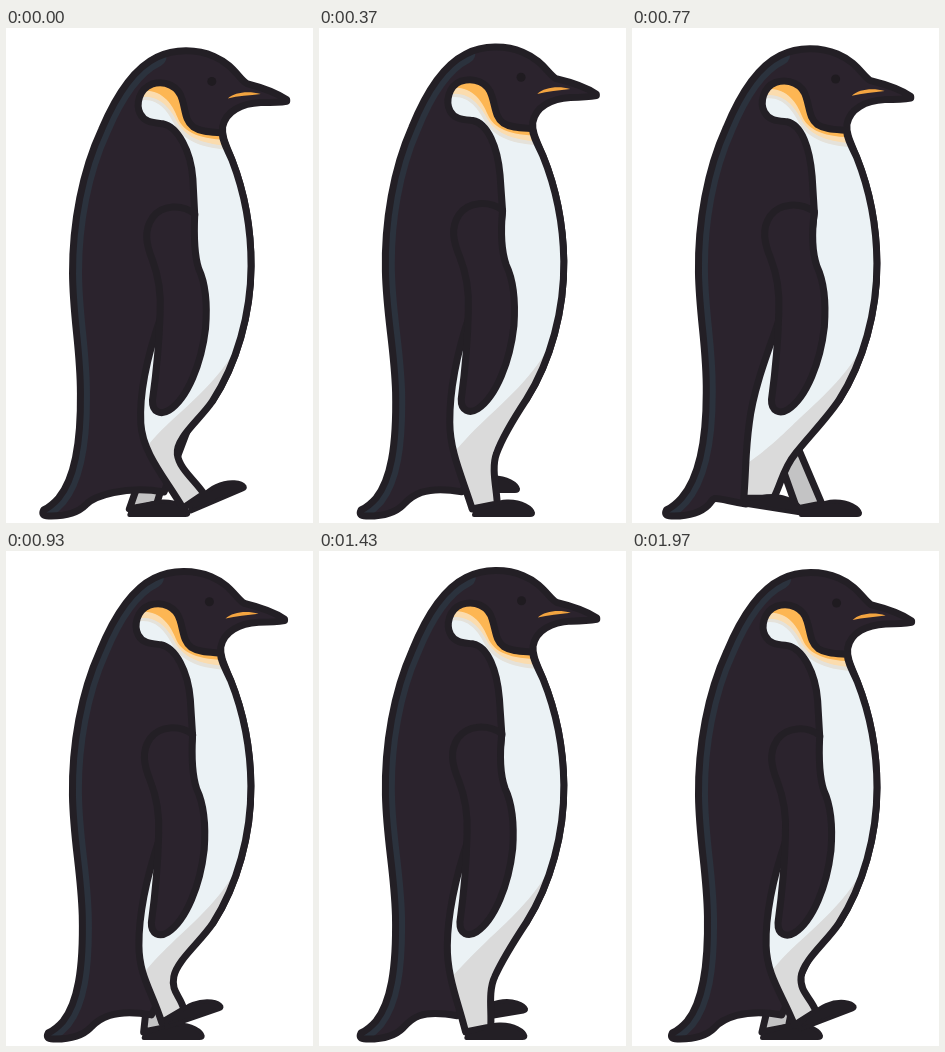
An HTML page for the animation above (2010 ms loop, 307 by 495 pixels).

```html
<!DOCTYPE html>
<html lang="en">
<head>
<meta charset="utf-8">
<title>Walking penguin</title>
<style>
  html, body { margin: 0; width: 100%; height: 100%; overflow: hidden; background: #fff; }
  svg { display: block; width: 100vw; height: 100vh; }
  path { fill: none; stroke-linejoin: round; stroke-linecap: round; }
  .dark { fill: #2b232d; }
  .line { stroke: #231f25; stroke-width: 7; }
  .foot { fill: #231f25; stroke: #231f25; stroke-width: 4; }
  .farLeg { fill: #c3c3c4; }
  .back { stroke: #2b323d; stroke-width: 19; }
  .white { fill: #ebf2f5; }
  .shade { fill: #dadada; }
  .cream { fill: #e5e2da; }
  .peach { fill: #fbdcae; }
  .orange { fill: #fdb653; }
  .eye { stroke: #1f1b20; stroke-width: 9; }
  .mouth { fill: #f3a440; }
</style>
</head>
<body>
<svg viewBox="0 0 307 495">
  <defs>
    <clipPath id="bodyClip"><path class="body"/></clipPath>
    <clipPath id="frontClip"><path class="front"/></clipPath>
  </defs>
  <path class="farLeg line"/>
  <path class="farFoot foot"/>
  <path class="body dark"/>
  <g clip-path="url(#bodyClip)"><path class="back"/></g>
  <path class="body line"/>
  <path class="front white"/>
  <g clip-path="url(#frontClip)">
    <path class="shade"/>
    <path class="cream"/>
    <path class="peach"/>
    <path class="orange"/>
  </g>
  <path class="front line"/>
  <path class="nearFoot foot"/>
  <path class="flipper dark line"/>
  <path class="eye"/>
  <path class="mouth"/>
</svg>
<script>
const FRAME = 33.5, CYCLE = 30;

// One stride: phase, heel x, heel y, foot angle, knee x, thigh x
const STRIDE = [
  [0, 184, 486, -23, 171.5, 135],
  [2, 186, 488, -16, 172, 134.5],
  [5, 184, 489, 0, 172, 134],
  [8, 169, 489, 0, 175, 132],
  [11, 153, 489, 0, 177, 130],
  [14, 130, 489, 0, 172, 123],
  [17, 110, 489, 0, 165, 115],
  [20, 100, 489, 0, 163, 110],
  [22, 101, 484, 8, 163, 113],
  [24, 116, 472, 10, 163, 121],
  [26, 140, 465, 0, 165, 128],
  [28, 159, 479, -19, 167.5, 132.5],
  [29, 167, 481, -21, 169, 134]
];
const FOOT = 'M2,-2 L4,-8 C15,-9 22,-15 35,-15.5 C50,-16 60,-9 61,-4 Q61,-2 58,-2 Z';

const clamp = (v, a, b) => Math.min(b, Math.max(a, v));
const wave = (phase, peak, period) => Math.cos(2 * Math.PI * (phase - peak) / period);
const mapPoints = (d, fn) => d.replace(/(-?[\d.]+),(-?[\d.]+)/g,
  (_, x, y) => fn(+x, +y).map(v => v.toFixed(2)).join(','));

const parts = {};
for (const el of document.querySelectorAll('path'))
  (parts[el.classList[0]] ||= []).push(el);
const set = (name, d) => parts[name].forEach(el => el.setAttribute('d', d));

function stride(phase, shift = 0) {
  const p = phase % CYCLE;
  let i = STRIDE.length - 1;
  while (STRIDE[i][0] > p) i--;
  const a = STRIDE[i], b = STRIDE[(i + 1) % STRIDE.length];
  const k = (p - a[0]) / ((b[0] || CYCLE) - a[0]);
  const [, x, y, angle, knee, thigh] = a.map((v, j) => v + (b[j] - v) * k);
  const r = angle * Math.PI / 180;
  const place = (u, v) => [
    x + shift + u * Math.cos(r) - v * Math.sin(r),
    y + u * Math.sin(r) + v * Math.cos(r)
  ];
  const lean = (x - 140) * 0.14;
  return {
    knee, thigh,
    foot: mapPoints(FOOT, place),
    heel: place(2 - Math.max(lean, 0), -8),
    ankle: place(27 - lean, -13)
  };
}

function draw(phase) {
  const bob = wave(phase, 3.1, 15);
  const swing = wave(phase, 3, CYCLE);
  const tail = -2 - 7.5 * wave(phase, 4.2, 15) + 1.5 * swing;
  const near = stride(phase), far = stride(phase + 15, -2);

  // The torso nods with each step; the feet stay put.
  const bend = (name, d) => set(name, mapPoints(d, (x, y) => {
    const k = 0.015 * bob * clamp((480 - y) / 230, 0, 1);
    return [x + k * (251 - y), y + k * (x + 16)];
  }));

  set('farLeg', `M144,422 L${far.heel} L${far.ankle} L167,422 Z`);
  set('farFoot', far.foot);
  set('nearFoot', near.foot);

  const [hx, hy] = near.heel, [ax, ay] = near.ankle;
  const { knee, thigh } = near;
  const t = x => x + tail;

  const back = `C126,40 108,70 95,101 C76,142 66,195 66.5,245
    C67,290 74.5,320 ${74.5 + tail * 0.25},365
    C${75 + tail * 0.4},420 ${67 + tail * 0.8},452 ${t(52)},470
    Q${t(45)},478 ${t(37)},482`;
  const ex = thigh + (hx - thigh) * 0.55;
  const ey = 464 + 14 * clamp((140 - ex) / 30, 0, 1);
  bend('back', 'M150,28.5 ' + back);
  bend('body', `M280,70.5 C267,61.5 252,57.5 240,54.5 C232,50 227,36 207,27.5
    C191,20.5 168,19.5 150,28.5 ${back}
    Q${t(34)},488 ${t(42)},488 C${t(61)},488.5 ${t(72)},484 ${t(79)},477
    C${t(87)},468 ${ex - 38},${ey - 7} ${ex},${ey}
    L190,380 L206.5,373 C231,335 245,285 245,237
    C245,200 238,163 225.5,131 C219,115 215,107 216,98
    C219,82 235,74.5 254,73.5 Q271,73.5 280,72 Z`);

  const chest = 185 + 4.3 * swing;
  const hip = 151 + 5 * swing;
  const slope = clamp((hx - hip) / 190 * 0.7, -0.25, 0.06) * 30;
  const turn = clamp(6 - (ax - knee) * 0.3, -3, 14);
  bend('front', `M215.5,104 C204,103 194,103 186.5,98 C178.5,92 179,82 175.5,71
    C172,57 158,51.5 145,55.5 C132,60.5 129,76 133.5,85 C138,94 147,94 156,95
    C171,98 ${chest - 4},122 ${chest - 2},150 L${chest},186
    L${chest - 8},250 L${hip},288
    C${hip - 11},320 ${thigh - slope},360 ${thigh},395
    C${thigh + slope},425 ${hx - (hx - thigh) * 0.45},${hy - 32} ${hx},${hy}
    L${ax},${ay}
    C${ax - (ax - knee) * 0.35},${ay - 14} ${knee - turn},441 ${knee},426
    C${knee + turn},410 194.5,391 206.5,373
    C231,335 245,285 245,237
    C245,200 238,163 225.5,131 C219,117 216,111 215.5,104 Z`);
  bend('shade', `M248,278 C232,335 195,365 165,393
    C150,407 138,420 ${thigh - 8},440 L${thigh - 30},500 L260,500 L260,278 Z`);
  bend('cream', 'M128,73 C150,66 161,82 168,96 C177,112 196,120 226,121 L226,45 L128,45 Z');
  bend('peach', 'M128,70 C151,62 164,80 171,94 C180,109 197,116 226,117 L226,45 L128,45 Z');
  bend('orange', 'M134,62 C156,60 166,76 171,89 C177,104 194,111 226,111 L226,45 L134,45 Z');

  const f = x => x + 5.8 * swing;
  bend('flipper', `M${chest},185 C${f(171)},175 ${f(151)},176 ${f(141.5)},189
    C${f(132.5)},202 ${f(135.5)},216 ${f(141.5)},231
    C${f(148.5)},249 ${f(150.5)},267 ${f(149.5)},285
    C${f(148.5)},320 ${f(145)},350 ${f(142)},372
    C${f(141.5)},384 ${f(150.5)},387 ${f(158.5)},382
    C${f(177)},370 ${f(191)},335 ${f(195)},300
    C${f(197)},275 ${f(195)},255 ${f(188)},240
    C${f(183)},225 ${f(183)},205 ${chest},185 Z`);

  bend('eye', 'M205,52.5 L205.01,52.5');
  bend('mouth', 'M221,69.5 C228,63 242,61.5 254,65 C243,66.5 231,67 221,69.5 Z');
}

const start = performance.now();
function tick() {
  const elapsed = performance.now() - start;
  draw(Math.floor(elapsed / FRAME + 0.25) % CYCLE);
  requestAnimationFrame(tick);
}
tick();
</script>
</body>
</html>
```
